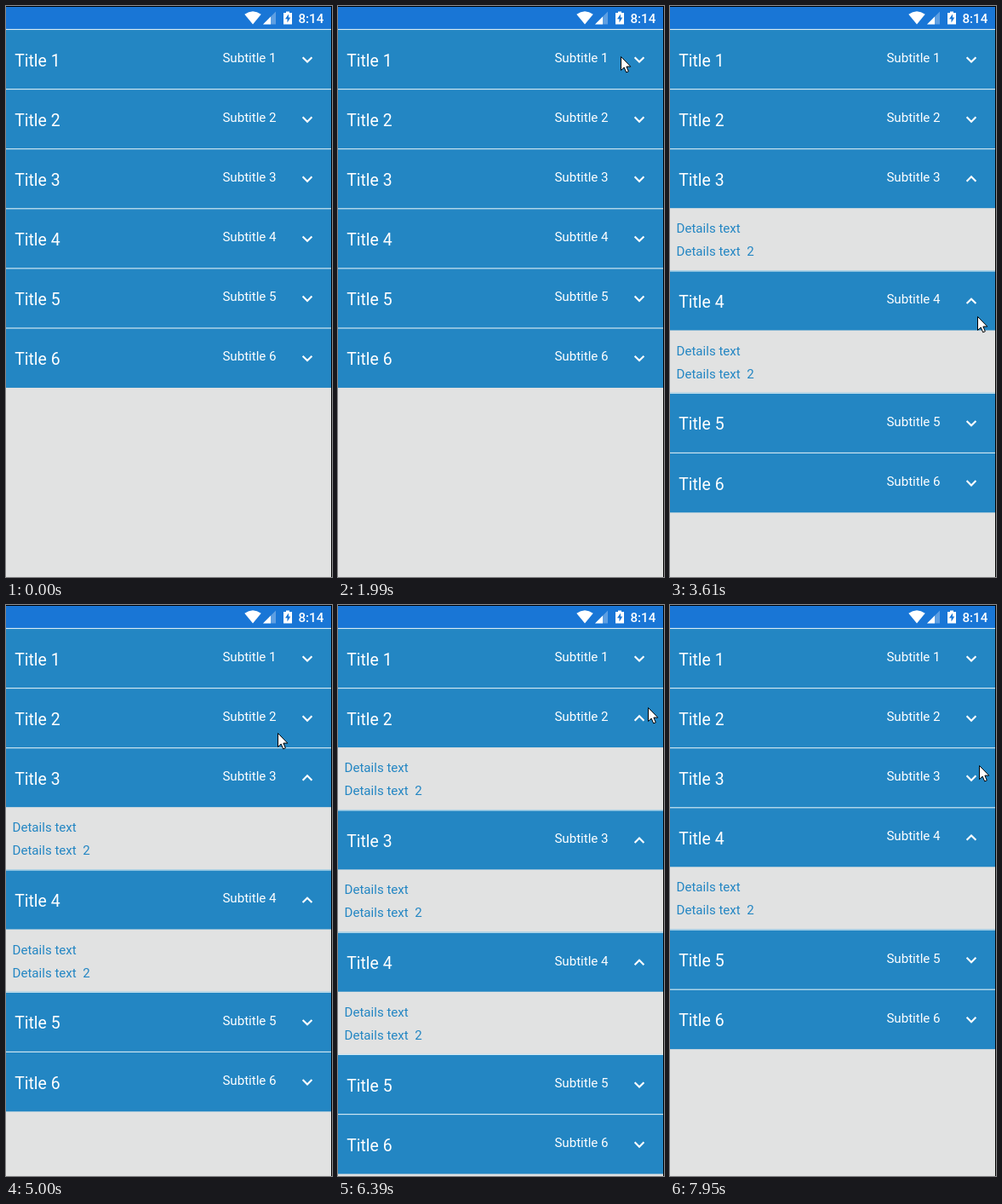
An HTML page with a canvas that plays this animation: 383 px wide and 670 px high, repeating every 8000 ms.

```html
<!DOCTYPE html>
<html lang="en">
<head>
<meta charset="utf-8">
<title>Expandable list</title>
<style>
  html, body { margin: 0; width: 100%; height: 100%; overflow: hidden; }
  canvas { display: block; }
</style>
</head>
<body>
<canvas width="383" height="670"></canvas>
<script>
const ctx = document.querySelector('canvas').getContext('2d');
const LOOP = 8000, TICK = 78, W = 383, H = 670;
const BLUE = '#2386c3', BAR = '#1976d6', PAGE = '#e1e2e2', WHITE = '#fff';
const LIST_TOP = 26.95, ROW = 70.1, DETAILS = 73.2, BODY = 15.1, HEADING = BODY * 18 / 14;

// Row number -> time it opens and closes
const openTimes = { 1: [1390, 1990], 2: [5390, 7100], 3: [2770, 7950], 4: [3610, LOOP] };
const busyTimes = [360, 1760];

// The pointer glides from each key point to the next, one step per tick
const entry = { x: 277.7, y: 656 };
const glides = [
  { at: 360, steps: 10, x: 332, y: 59 },
  { at: 2140, steps: 6, x: 342, y: 209 },
  { at: 2770, steps: 9, x: 361, y: 364 },
  { at: 3840, steps: 8, x: 312, y: 551 },
  { at: 4530, steps: 7, x: 319, y: 150, bend: -47 },
  { at: 5700, steps: 3, x: 371, y: 117 },
  { at: 6080, steps: 4, x: 364, y: 120 },
  { at: 7320, steps: 4, x: 363, y: 188 }
];

const within = (t, [from, to]) => t >= from && t < to;
const ease = p => (1 - Math.cos(Math.PI * p)) / 2;

function pointerAt(t) {
  let { x, y } = entry;
  for (const { at, steps, x: tx, y: ty, bend = 0 } of glides) {
    if (t < at) break;
    const step = Math.floor((t - at) / TICK + 0.1) + 1;
    const p = ease(Math.min(1, step / steps));
    x += (tx - x) * p + 2 * bend * p * (1 - p);
    y += (ty - y) * p;
  }
  return [Math.round(x), Math.round(y)];
}

function rect(x, y, w, h, color) {
  ctx.fillStyle = color;
  ctx.fillRect(x, y, w, h);
}

function text(str, x, y, size, color = WHITE, weight = 400) {
  ctx.font = `${weight} ${size}px Roboto, sans-serif`;
  ctx.fillStyle = color;
  ctx.fillText(str, x, y);
}

function fillPath(d, color) {
  ctx.fillStyle = color;
  ctx.fill(new Path2D(d));
}

function ring(x, y, r, width, color, from = 0, to = 2 * Math.PI) {
  ctx.beginPath();
  ctx.arc(x, y, r, from, to);
  ctx.lineWidth = width;
  ctx.strokeStyle = color;
  ctx.stroke();
}

function statusBar() {
  rect(0, 0, W, 27, BAR);
  fillPath('M290 21.5L280.3 9.8Q290 2.8 299.7 9.8Z', WHITE);
  fillPath('M302 21.5L317 6.5V21.5Z', 'rgba(255,255,255,.3)');
  fillPath('M302 21.5L311 12.5V21.5Z', WHITE);
  fillPath('M326 8H329V6.5H333V8H336V21.5H326Z', WHITE);
  fillPath('M332 9.5L328 15.3H330.5V19.5L334.3 13.5H332Z', BAR);
  text('8:14', 343.5, 20, BODY, WHITE, 500);
}

function chevron(x, y, up) {
  const dy = up ? -2.7 : 2.7;
  ctx.beginPath();
  ctx.moveTo(x - 5.4, y - dy);
  ctx.lineTo(x, y + dy);
  ctx.lineTo(x + 5.4, y - dy);
  ctx.strokeStyle = WHITE;
  ctx.lineWidth = 2.1;
  ctx.stroke();
}

function list(t) {
  let top = LIST_TOP;
  for (let n = 1; n <= 6; n++) {
    const open = n in openTimes && within(t, openTimes[n]);
    rect(0, top, W, ROW + 0.4, BLUE);
    rect(0, top, W, 1.1, '#d9edf5');
    text('Title ' + n, 10.2, Math.round(top + 43.7), HEADING);
    text('Subtitle ' + n, 254.4, Math.round(top + 39), BODY);
    chevron(354, top + 35.9, open);
    top += ROW;
    if (open) {
      rect(0, top, W, DETAILS, PAGE);
      text('Details text', 7.5, Math.round(top + 29), BODY, BLUE);
      text('Details text\u00a0 2', 7.5, Math.round(top + 56), BODY, BLUE);
      top += DETAILS;
    }
  }
}

function pointer(x, y, busy) {
  const arrow = new Path2D('M0 0V16L3.7 12.6L6.2 18.4L8.8 17.3L6.4 11.6H11.3Z');
  ctx.save();
  ctx.translate(x + 0.5, y + 0.5);
  ctx.fillStyle = WHITE;
  ctx.fill(arrow);
  ctx.strokeStyle = '#000';
  ctx.lineWidth = 1;
  ctx.stroke(arrow);
  if (busy) {
    ring(14, 0.5, 5.2, 4.8, '#1280da');
    ring(14, 0.5, 4.4, 2.4, '#37b6f0', 2, 3.6);
  }
  ctx.restore();
}

function draw(now) {
  const t = now % LOOP;
  rect(0, 0, W, H, PAGE);
  statusBar();
  list(t);
  if (t >= glides[0].at) pointer(...pointerAt(t), within(t, busyTimes));
  rect(0, 0, W, 1, '#000');
  rect(W - 1, 0, 1, H, '#000');
  requestAnimationFrame(draw);
}
requestAnimationFrame(draw);
</script>
</body>
</html>
```
